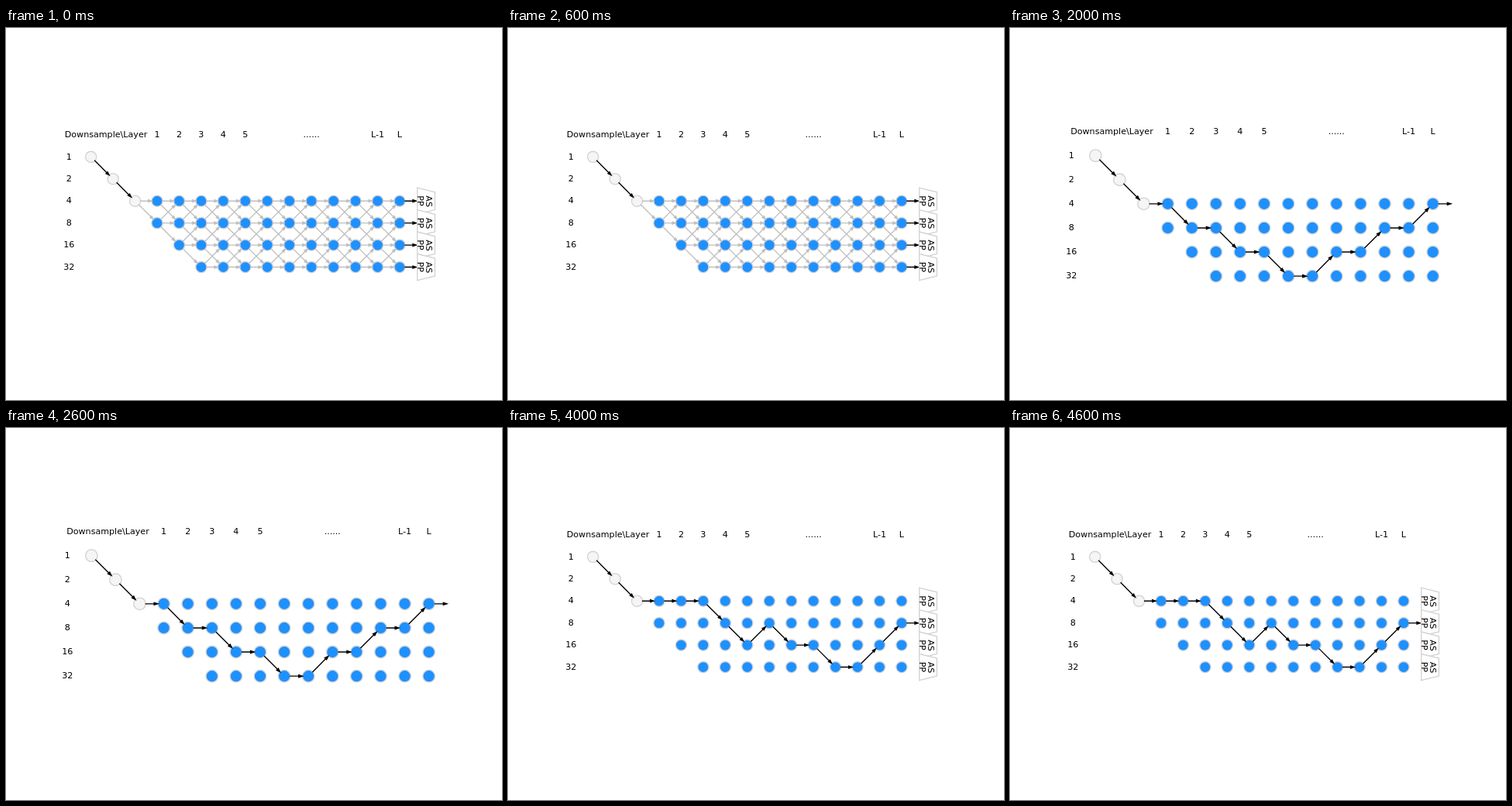
Write an HTML page that moves like this. It is 640 by 480 pixels and loops after 5000 ms.

```html
<!DOCTYPE html>
<html lang="en">
<head>
<meta charset="utf-8">
<title>Network paths</title>
<style>
  html, body { margin: 0; width: 100%; height: 100%; overflow: hidden; background: #fff; }
  svg { display: block; width: 640px; height: 480px; }
  text { font: 11.11px "DejaVu Sans", sans-serif; fill: #000; }
  .node, .head { stroke: #d3d3d3; stroke-width: 1.39; }
  .stem { fill: #f5f5f5; }
  .cell { fill: #1e90ff; }
  .head { fill: #fff; }
  .arrow { stroke-width: 1.39; stroke-linecap: square; stroke-miterlimit: 10; }
</style>
</head>
<body>
<svg id="stage" viewBox="0 0 640 480"></svg>
<script>
const STEP = 1000;
const COLS = 12, ROWS = 4, STEM = 3;
const LEFT = 102.545, WIDTH = 450.91, MIDDLE = 242.4;
const BLACK = '#000', GRAY = '#c0c0c0';

// Each path lists the row used in columns 1 to 12; null shows every connection.
const scenes = [
  { heads: true, path: null },
  { heads: true, path: [1, 1, 1, 1, 2, 2, 2, 2, 2, 2, 2, 2] },
  { heads: false, path: [0, 1, 1, 2, 2, 3, 3, 2, 2, 1, 1, 0] },
  { heads: false, path: [1, 2, 3, 2, 1, 0, 1, 2, 3, 2, 1, 0] },
  { heads: true, path: [0, 0, 0, 1, 2, 1, 2, 2, 3, 3, 2, 1] }
];

const columnLabels = { 1: '1', 2: '2', 3: '3', 4: '4', 5: '5', 8: '......', 11: 'L-1', 12: 'L' };

// Row r exists in column c once enough downsampling steps were taken.
const exists = (c, r) => r >= 0 && r < ROWS && (c === 0 ? r === 0 : r <= c);

function connections(path) {
  const black = [[0, -2, 1, -1], [1, -1, 2, 0]].map(([a, ra, b, rb]) => [a - 2, ra, b - 2, rb]);
  const gray = [];
  if (path) {
    [0, ...path].forEach((r, c) => black.push([c, r, c + 1, c < COLS ? path[c] : r]));
  } else {
    for (let c = 0; c < COLS; c++) {
      for (let r = 0; r < ROWS; r++) {
        if (!exists(c, r)) continue;
        for (const next of [r - 1, r, r + 1]) {
          if (exists(c + 1, next)) gray.push([c, r, c + 1, next]);
        }
      }
    }
    for (let r = 0; r < ROWS; r++) black.push([COLS, r, COLS + 1, r]);
  }
  return { black, gray };
}

function drawScene({ heads, path }) {
  const unit = WIDTH / (heads ? 15.85 : 14.5);
  const x = c => LEFT + (c + 2.25) * unit;
  const y = r => MIDDLE + (r + 2 - (heads ? 2.675 : 2.5)) * unit;

  const label = (c, r, text) =>
    `<text x="${x(c)}" y="${Math.round(y(r) + 3.3)}" text-anchor="middle">${text}</text>`;

  const node = (c, r, kind) =>
    `<circle class="node ${kind}" cx="${x(c)}" cy="${y(r)}" r="${unit / 4}"/>`;

  const arrow = color => ([c1, r1, c2, r2]) => {
    const angle = Math.atan2(r2 - r1, c2 - c1) * 180 / Math.PI;
    const tip = (Math.hypot(c2 - c1, r2 - r1) - 0.25) * unit;
    const base = tip - 0.15 * unit, half = 0.05 * unit;
    return `<path class="arrow" fill="${color}" stroke="${color}"
      transform="translate(${x(c1)} ${y(r1)}) rotate(${angle})"
      d="M${unit / 4} 0H${base}M${base} ${-half}L${tip} 0L${base} ${half}Z"/>`;
  };

  const vertical = (left, top, text) =>
    `<text transform="translate(${left} ${top}) rotate(90)">${text}</text>`;

  const head = r => {
    const near = x(COLS + 0.8), far = x(COLS + 1.6);
    const top = y(r) - 6.9;
    return `<path class="head" d="M${near} ${y(r - 0.6)}L${far} ${y(r - 0.4)}
      V${y(r + 0.4)}L${near} ${y(r + 0.6)}Z"/>` +
      vertical(near + 11.2, top, 'AS') + vertical(near + 0.6, top, 'PP');
  };

  const parts = [label(-1.32, -3, 'Downsample\\Layer')];
  for (const c in columnLabels) parts.push(label(+c, -3, columnLabels[c]));
  for (let r = -2; r < ROWS; r++) parts.push(label(-3, r, 2 ** (r + 2)));
  for (let i = 0; i < STEM; i++) parts.push(node(i - 2, i - 2, 'stem'));
  for (let c = 1; c <= COLS; c++) {
    for (let r = 0; r < ROWS; r++) if (exists(c, r)) parts.push(node(c, r, 'cell'));
  }

  const { black, gray } = connections(path);
  parts.push(...gray.map(arrow(GRAY)), ...black.map(arrow(BLACK)));
  if (heads) for (let r = 0; r < ROWS; r++) parts.push(head(r));
  return parts.join('');
}

const stage = document.getElementById('stage');
const start = performance.now();
let shown = -1;

function update() {
  const index = Math.floor((performance.now() - start) / STEP) % scenes.length;
  if (index !== shown) {
    stage.innerHTML = drawScene(scenes[index]);
    shown = index;
  }
  requestAnimationFrame(update);
}
update();
</script>
</body>
</html>
```
